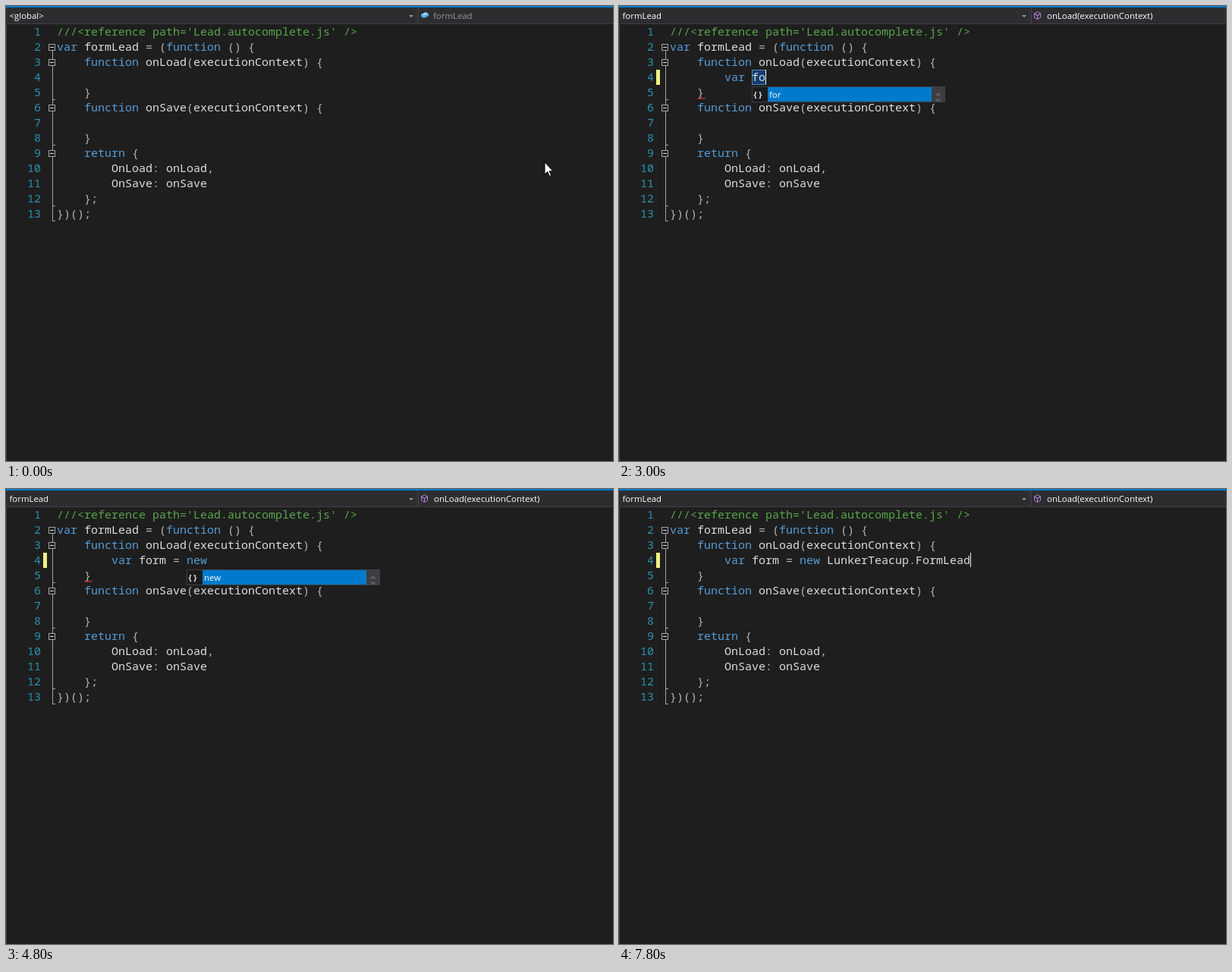
An HTML page with a canvas for the animation above (8000 ms loop, 800 by 600 pixels).

```html
<!DOCTYPE html>
<html lang="en">
<head>
<meta charset="utf-8">
<title>Code editor</title>
<style>
  html, body { margin: 0; width: 100%; height: 100%; overflow: hidden; background: #1e1e1e; }
  canvas { display: block; }
</style>
</head>
<body>
<canvas id="stage" width="800" height="600"></canvas>
<script>
const ctx = document.getElementById('stage').getContext('2d');
const LOOP = 8000, CHAR = 9, ROW = 19, LEFT = 67, INDENT = 8;
const CODE_FONT = '15px "Noto Sans Mono", monospace';
const UI_FONT = '11.4px "Open Sans", sans-serif';
const ICON_FONT = 'bold 10.5px "Open Sans", sans-serif';
const PLAIN = '#dcdcdc', KEYWORD = '#569cd6', PUNCT = '#b4b4b4', COMMENT = '#57a64a';

const LINES = [
  "///<reference path='Lead.autocomplete.js' />",
  'var formLead = (function () {',
  '    function onLoad(executionContext) {',
  '',
  '    }',
  '    function onSave(executionContext) {',
  '',
  '    }',
  '    return {',
  '        OnLoad: onLoad,',
  '        OnSave: onSave',
  '    };',
  '})();'
];

const WORD = 'LunkerTeacup';
const NEW = 'var form = new ';
const FULL = NEW + WORD;

// Popup rows: a leading * marks a class icon.
const list = (col, rows, selected = 0, narrow = false) => ({ col, rows: rows.split(' '), selected, narrow });
const newList = list(11, 'name NaN navigator *Navigator new *Node *NodeFilter *NodeList *Notification', 4);
const newRow = list(11, 'new');
const wordList = list(15, `let localStorage location *Location locationbar ${WORD} Map matchMedia *Math`, 3);
const wordRow = list(15, WORD);
const members = list(28, '*FormContact *FormLead', 1, true);

// Each step replaces the previous state; mark is the column where the highlight starts.
const STEPS = [
  [0, { mouse: [710, 206] }],
  [200, { mouse: [612, 186], topCaret: true }],
  [400, { mouse: [410, 144], topCaret: true }],
  [600, { mouse: [222, 108], topCaret: true }],
  [800, { mouse: [150, 97] }],
  [1200, { text: '', mouse: [150, 97], caret: true }],
  [1400, { text: '', mouse: [166, 118], caret: true }],
  [1600, { text: '' }],
  [2200, { text: '', caret: true }],
  [2400, { text: 'v', mark: 0, caret: true }],
  [2600, { text: 'var', mark: 0, caret: true, popup: list(0, 'var') }],
  [2800, { text: 'var ', caret: true }],
  [3000, { text: 'var fo', mark: 4, caret: true, error: true, popup: list(4, 'for') }],
  [3200, { text: 'var fo', mark: 4, caret: true, error: true }],
  [3400, { text: 'var for', mark: 4, caret: true, error: true }],
  [3600, { text: 'var form', caret: true, error: true }],
  [3800, { text: 'var form', error: true }],
  [4200, { text: 'var form =', caret: true, error: true }],
  [4400, { text: 'var form = n', mark: 11, caret: true, error: true, popup: newList }],
  [4600, { text: 'var form = ne', mark: 11, caret: true, error: true, popup: newRow }],
  [4800, { text: 'var form = new', error: true, popup: newRow }],
  [5000, { text: NEW, caret: true, error: true }],
  [5200, { text: NEW, error: true }],
  [5400, { text: NEW + 'L', mark: 15, caret: true, error: true, popup: wordList }],
  [5600, { text: NEW + WORD.slice(0, 2), mark: 15, caret: true, error: true, popup: wordRow }],
  [5800, { text: NEW + WORD.slice(0, 4), mark: 15, caret: true, error: true, popup: wordRow }],
  [6000, { text: NEW + WORD.slice(0, 7), mark: 15, caret: true, error: true, popup: wordRow }],
  [6200, { text: NEW + WORD.slice(0, 10), mark: 15, caret: true, error: true, popup: wordRow }],
  [6400, { text: FULL, mark: 15, caret: true }],
  [6800, { text: FULL + '.', caret: true, error: true }],
  [7000, { text: FULL + '.', caret: true, error: true, popup: members }],
  [7400, { text: FULL + '.F', mark: 28, caret: true, error: true, popup: members }],
  [7600, { text: FULL + '.FormLead', error: true }],
  [7800, { text: FULL + '.FormLead', caret: true }]
];

function rect(x, y, w, h, color) {
  ctx.fillStyle = color;
  ctx.fillRect(x, y, w, h);
}

function frame(x, y, w, h, color) {
  ctx.strokeStyle = color;
  ctx.lineWidth = 1;
  ctx.strokeRect(x + 0.5, y + 0.5, w - 1, h - 1);
}

function poly(points, fill, stroke) {
  ctx.beginPath();
  points.forEach(([x, y]) => ctx.lineTo(x, y));
  ctx.closePath();
  if (fill) { ctx.fillStyle = fill; ctx.fill(); }
  if (stroke) { ctx.strokeStyle = stroke; ctx.lineWidth = 1; ctx.stroke(); }
}

function label(text, x, y, color, font = UI_FONT, align = 'left') {
  ctx.font = font;
  ctx.textAlign = align;
  ctx.fillStyle = color;
  ctx.fillText(text, x, y);
}

// dir: -1 points up, 1 points down
const triangle = (x, y, r, dir, color) =>
  poly([[x - r, y - dir * r / 2], [x + r, y - dir * r / 2], [x, y + dir * r / 2]], color);

function codeLine(text, row) {
  const y = 39 + row * 20;
  if (text.startsWith('//')) return label(text, LEFT, y, COMMENT, CODE_FONT);
  for (const { 0: token, index } of text.matchAll(/\w+|[^\w\s]+/g)) {
    const color = /^(var|function|return|new)$/.test(token) ? KEYWORD : /\w/.test(token) ? PLAIN : PUNCT;
    label(token, LEFT + index * CHAR, y, color, CODE_FONT);
  }
}

function classIcon(x, y) {
  poly([[x - 5, y - 1], [x + 1, y - 4], [x + 5, y - 2], [x + 5, y + 1], [x - 1, y + 4], [x - 5, y + 2]], '#55aaeb');
  poly([[x - 4, y - 1], [x + 1, y - 3.5], [x + 4, y - 2], [x - 1, y + 0.5]], '#a9d8fb');
}

function methodIcon(x, y) {
  poly([[x - 4, y - 2.5], [x, y - 5], [x + 4, y - 2.5], [x + 4, y + 2.5], [x, y + 5], [x - 4, y + 2.5]], null, '#b180d7');
  poly([[x - 4, y - 2.5], [x, y], [x + 4, y - 2.5], [x, y], [x, y + 5], [x, y]], null, '#b180d7');
}

function header(inside) {
  rect(0, 0, 800, 23, '#2d2d30');
  rect(0, 0, 800, 2, '#007acc');
  rect(0, 23, 800, 1, '#3f3f46');
  rect(540, 2, 1, 21, '#39393e');
  rect(543, 2, 1, 21, '#434346');
  triangle(534, 13.5, 3, 1, '#999999');
  label(inside ? 'formLead' : '<global>', 4.5, 17, '#ffffff');
  if (inside) methodIcon(551.5, 12.5);
  else classIcon(552, 12);
  label(inside ? 'onLoad(executionContext)' : 'formLead', inside ? 564 : 563, 17, inside ? '#ffffff' : '#999999');
}

function outline() {
  const gray = '#a5a5a5';
  rect(61, 59, 1, 225, gray);
  for (const y of [123, 183, 263, 283]) rect(61, y, 4, 1, gray);
  for (const y of [54, 74, 134, 194]) {
    rect(56, y - 4, 9, 9, '#1e1e1e');
    frame(56, y - 4, 9, 9, gray);
    rect(58, y, 5, 1, '#e0e0e0');
  }
}

function squiggle() {
  ctx.beginPath();
  for (let i = 0; i <= 5; i++) ctx.lineTo(103.5 + i * 2, i % 2 ? 120.5 : 123);
  ctx.strokeStyle = '#fc3e36';
  ctx.lineWidth = 1;
  ctx.stroke();
}

function drawPopup({ col, rows, selected, narrow }) {
  const x = LEFT + (INDENT + col) * CHAR, top = 107;
  const width = narrow ? 104 : 255, bar = narrow ? 1 : 18, height = rows.length * ROW;
  rect(x, top - 1, width, height + 2, '#1b1b1c');
  rows.forEach((row, i) => {
    const y = top + i * ROW, isClass = row[0] === '*';
    if (i === selected) rect(x + 21, y, width - 21 - bar, ROW, '#007acc');
    if (isClass) classIcon(x + 8, y + 10);
    else label('{ }', x + 8, y + 14, '#e0e0e0', ICON_FONT, 'center');
    label(row.replace('*', ''), x + 23, y + 14, '#ffffff');
  });
  if (!narrow) {
    const scrollable = rows.length > 1, mid = x + width - 9.5;
    const color = scrollable ? '#999999' : '#5a5a5f';
    rect(x + width - bar, top, bar, height, '#3e3e42');
    triangle(mid, top + 9, 4.5, -1, color);
    triangle(mid, top + height - (scrollable ? 8 : 1), 4.5, 1, color);
    if (scrollable) rect(mid - 4.5, 171, 9, 9, '#6c6c6c');
  }
  frame(x, top - 1, width, height + 2, '#3f3f46');
}

function drawMouse([x, y]) {
  const shape = [[0, 0], [0, 16], [3.7, 12.6], [6.3, 18.5], [8.6, 17.5], [6.1, 11.8], [11, 11.8]];
  poly(shape.map(([dx, dy]) => [x + dx, y + dy]), '#ffffff', '#000000');
}

function draw(time) {
  const state = STEPS.findLast(([start]) => start <= time)[1];
  const { text, mark, popup, mouse } = state;
  const typedX = LEFT + INDENT * CHAR;

  rect(0, 0, 800, 600, '#1e1e1e');
  rect(0, 24, 1, 576, '#3f3f46');
  header(text !== undefined);
  outline();
  if (time >= 2200) rect(49, 84, 5, 20, '#eff284');

  if (mark !== undefined) {
    const x = typedX + mark * CHAR, width = (text.length - mark) * CHAR + 1;
    rect(x, 84, width, 20, '#113d6f');
    frame(x, 84, width, 20, '#5f83aa');
  }
  LINES.forEach((line, i) => {
    label(i + 1, 46, 39 + i * 20, '#2b91af', CODE_FONT, 'right');
    codeLine(i === 3 && text ? ' '.repeat(INDENT) + text : line, i);
  });
  if (state.topCaret) rect(LEFT, 24, 1, 20, PLAIN);
  if (state.caret) rect(typedX + text.length * CHAR, 84, 1, 19, '#f0f0f0');
  if (state.error) squiggle();
  if (popup) drawPopup(popup);
  if (mouse) drawMouse(mouse);
}

function tick() {
  draw(performance.now() % LOOP);
  requestAnimationFrame(tick);
}
tick();
</script>
</body>
</html>
```
